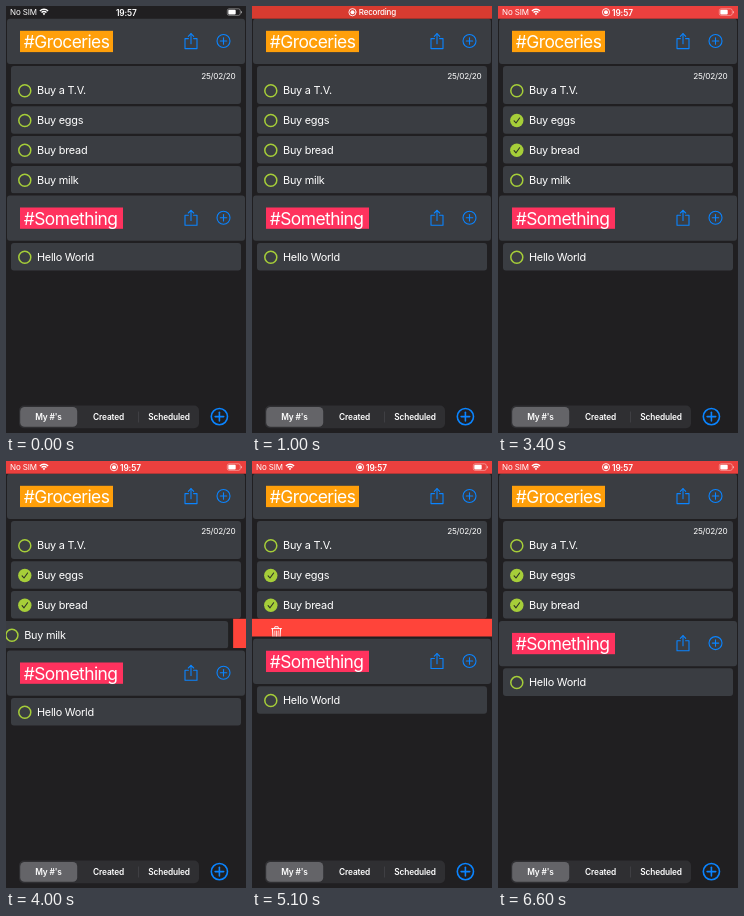
An HTML page with a canvas that plays this animation: 240x427 px, repeating every 6700 ms.

```html
<!DOCTYPE html>
<html lang="en">
<head>
<meta charset="utf-8">
<title>Hashtag lists</title>
<style>
html, body { margin: 0; width: 100%; height: 100%; overflow: hidden; background: #201f21; }
canvas { display: block; width: 240px; height: 427px; }
</style>
</head>
<body>
<canvas id="stage"></canvas>
<script>
const W = 240, H = 427, LOOP = 6700;
const FONT = 'Inter, "Liberation Sans", sans-serif';
const BG = '#201f21', CARD = '#3a3d42', BLUE = '#0a84ff', GREEN = '#a6ce39', RED = '#ff443a';
const ROW = 29.6;

// Moments of the story, in ms
const T = { bar: 450, eggs: 1650, clock: 2750, bread: 2950, drag: 3900, held: 4600, drop: 4750, gone: 4950, closed: 5300 };

const canvas = document.getElementById('stage');
const c = canvas.getContext('2d');
const dpr = window.devicePixelRatio || 1;
canvas.width = W * dpr;
canvas.height = H * dpr;

const clamp = v => Math.min(1, Math.max(0, v));
const ease = v => v * v * (3 - 2 * v);
const phase = (t, a, b) => ease(clamp((t - a) / (b - a)));

function box(x, y, w, h, r, fill) {
  c.fillStyle = fill;
  c.beginPath();
  c.roundRect(x, y, w, h, r);
  c.fill();
}

function text(str, x, y, size, { weight = 400, align = 'left', track = -0.25, fill = '#fff' } = {}) {
  c.font = `${weight} ${size}px ${FONT}`;
  c.letterSpacing = track + 'px';
  c.textAlign = align;
  c.fillStyle = fill;
  c.fillText(str, x, y);
}

function circle(x, y, r, width, color) {
  c.beginPath();
  c.arc(x, y, r, 0, Math.PI * 2);
  if (width) {
    c.lineWidth = width;
    c.strokeStyle = color;
    c.stroke();
  } else {
    c.fillStyle = color;
    c.fill();
  }
}

function line(points, width, color) {
  c.lineWidth = width;
  c.strokeStyle = color;
  c.lineCap = c.lineJoin = 'round';
  c.beginPath();
  points.forEach(([x, y]) => c.lineTo(x, y));
  c.stroke();
}

function plus(x, y, r, arm, width) {
  circle(x, y, r, width, BLUE);
  line([[x - arm, y], [x + arm, y]], width, BLUE);
  line([[x, y - arm], [x, y + arm]], width, BLUE);
}

function share(x, y) {
  line([[x - 2.6, y - 2.7], [x - 6, y - 2.7], [x - 6, y + 7.3], [x + 6, y + 7.3], [x + 6, y - 2.7], [x + 2.6, y - 2.7]], 1.1, BLUE);
  line([[x, y + 2.4], [x, y - 7.6]], 1.1, BLUE);
  line([[x - 2.7, y - 5], [x, y - 7.7], [x + 2.7, y - 5]], 1.1, BLUE);
}

function header(y, label, width, color) {
  box(1, y, 238, 45.3, 3, CARD);
  c.fillStyle = color;
  c.fillRect(14, y + 12, width, 21.3);
  text(label, 17.8, y + 29.2, 17.4, { track: -0.55 });
  share(185, y + 22.5);
  plus(217.5, y + 22.2, 6.5, 3.2, 1.1);
}

function tick(x, y, done) {
  if (!done) return circle(x, y, 6, 1.5, GREEN);
  circle(x, y, 6.7, 0, GREEN);
  line([[x - 2.7, y + 0.3], [x - 0.8, y + 2.5], [x + 2.8, y - 2.5]], 1.1, '#2c3028');
}

function item(y, label, done = false, x = 0) {
  box(x + 5, y, 230, 27.6, 3, CARD);
  tick(x + 18.8, y + 14.3, done);
  text(label, x + 31, y + 18, 10.9);
}

function trash(x, y) {
  line([[x - 5, y - 4.4], [x + 5, y - 4.4]], 1, '#fff');
  line([[x - 1.9, y - 4.6], [x - 1.6, y - 6.3], [x + 1.6, y - 6.3], [x + 1.9, y - 4.6]], 0.9, '#fff');
  line([[x - 4, y - 4.2], [x - 3.4, y + 6.4], [x + 3.4, y + 6.4], [x + 4, y - 4.2]], 1, '#fff');
  [-1.7, 0, 1.7].forEach(d => line([[x + d, y - 2.2], [x + d * 0.9, y + 4.2]], 0.75, '#fff'));
}

function wifi(x, y) {
  c.lineCap = 'butt';
  [5.8, 3.5].forEach(r => {
    c.beginPath();
    c.arc(x, y, r, -Math.PI * 0.75, -Math.PI * 0.25);
    c.lineWidth = 1.4;
    c.strokeStyle = '#fff';
    c.stroke();
  });
  c.beginPath();
  c.moveTo(x, y + 0.2);
  c.arc(x, y, 1.8, -Math.PI * 0.75, -Math.PI * 0.25);
  c.fillStyle = '#fff';
  c.fill();
}

function battery() {
  c.lineWidth = 0.7;
  c.strokeStyle = 'rgba(255,255,255,.55)';
  c.beginPath();
  c.roundRect(221.3, 2.8, 13, 6.6, 1.9);
  c.stroke();
  box(222.3, 3.8, 7.4, 4.6, 1, '#fff');
  box(235, 5, 1, 2.2, 0.5, 'rgba(255,255,255,.55)');
}

function record(x) {
  circle(x, 6.2, 3.6, 0.9, '#fff');
  circle(x, 6.2, 2, 0, '#fff');
}

function statusBar(t) {
  if (t >= T.bar) {
    const glow = phase(t, 900, 1500);
    c.fillStyle = t < T.clock ? `rgb(${213 + 42 * glow},59,48)` : '#ec403e';
    c.fillRect(0, 0, W, 12.7);
  }
  if (t >= T.bar && t < T.clock) {
    record(100.5);
    text('Recording', 106.8, 9.4, 8, { weight: 500, track: -0.2 });
    return;
  }
  text('No SIM', 4, 9.4, 8, { track: -0.1 });
  wifi(38, 9);
  if (t < T.bar) {
    text('19:57', 120.3, 9.5, 8.3, { weight: 600, align: 'center', track: -0.1 });
  } else {
    record(108);
    text('19:57', 114, 9.5, 8.3, { weight: 600, track: -0.1 });
  }
  battery();
}

function milkRow(t, shut) {
  const y = 157.6;
  if (t >= T.closed) return;
  c.save();
  c.beginPath();
  c.rect(0, y, W, ROW * (1 - shut));
  c.clip();
  const pull = 228 * phase(t, T.drag, T.held) + 12 * phase(t, T.drop, T.gone);
  item(160, 'Buy milk', false, -pull);
  if (pull > 0) {
    c.fillStyle = RED;
    c.fillRect(W - pull, y, pull, ROW);
    trash(W - pull + 24.5, 172);
  }
  c.restore();
}

function toolbar() {
  box(13, 399.6, 180, 22.6, 5, '#2f2f32');
  box(14.2, 401, 57, 19.8, 4.4, '#646468');
  c.fillStyle = '#47474b';
  c.fillRect(132, 405.5, 0.7, 11);
  [["My #'s", 42.5], ['Created', 102.6], ['Scheduled', 163]].forEach(([label, x]) =>
    text(label, x, 413.9, 8.3, { weight: 600, align: 'center', track: -0.12 }));
  plus(213.4, 410.6, 8.1, 4.3, 1.6);
}

function draw(t) {
  c.setTransform(dpr, 0, 0, dpr, 0, 0);
  c.fillStyle = BG;
  c.fillRect(0, 0, W, H);

  header(12.8, '#Groceries', 93, '#ff9f0a');
  box(5, 60, 230, 38, 3, CARD);
  text('25/02/20', 229.3, 73.4, 8.2, { align: 'right' });
  tick(18.8, 84.8, false);
  text('Buy a T.V.', 31, 88.4, 10.9);
  item(100.2, 'Buy eggs', t >= T.eggs);
  item(130, 'Buy bread', t >= T.bread);

  const shut = phase(t, T.gone, T.closed);
  milkRow(t, shut);
  const up = ROW * shut;
  header(189.5 - up, '#Something', 103, '#ff325e');
  item(236.9 - up, 'Hello World');

  toolbar();
  statusBar(t);
}

function frame(now) {
  draw(now % LOOP);
  requestAnimationFrame(frame);
}
requestAnimationFrame(frame);
</script>
</body>
</html>
```
